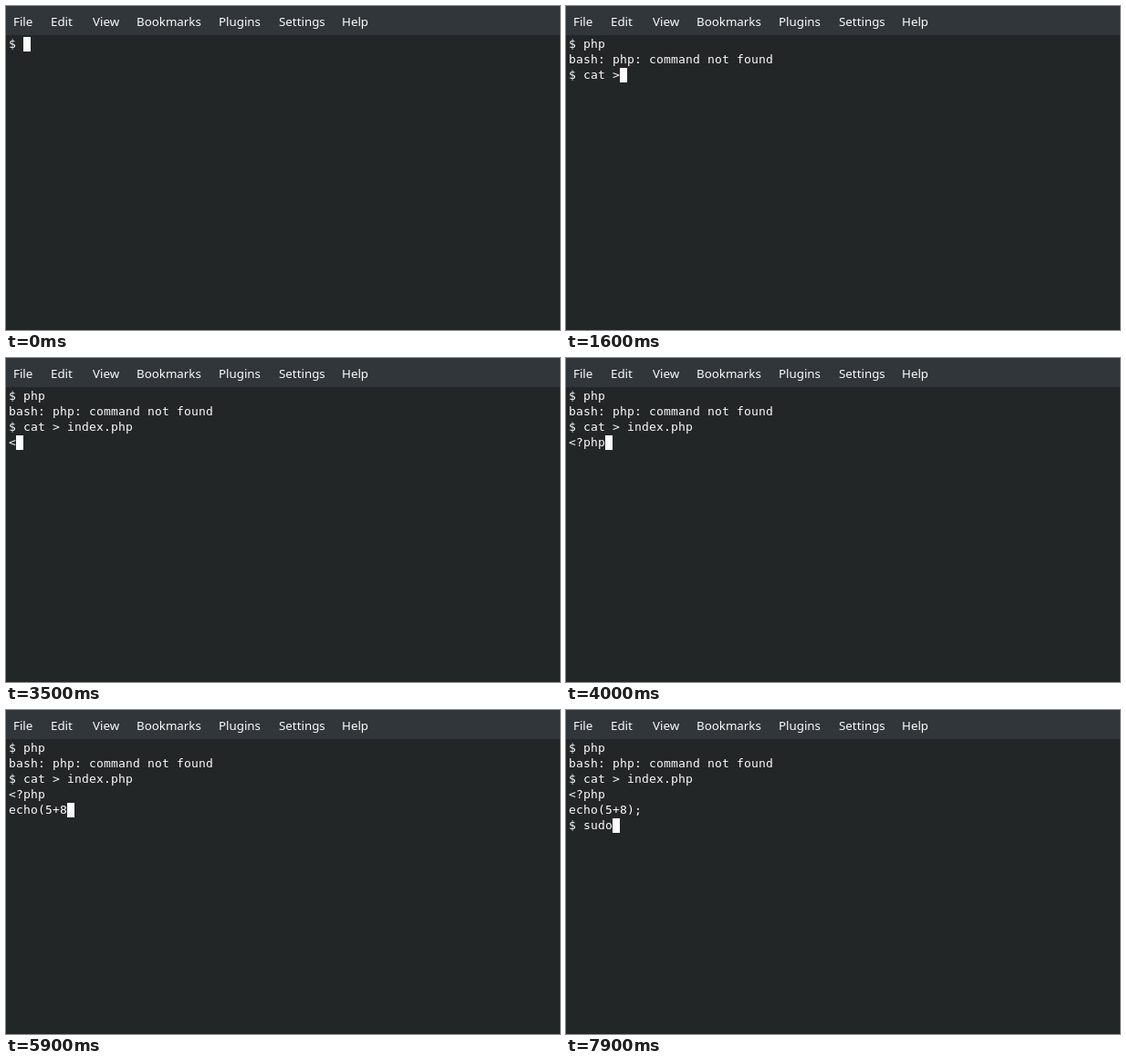
Recreate the animation shown at these times as an HTML page with a canvas. Size 607 by 356 pixels, loop 8 s.

```html
<!DOCTYPE html>
<html lang="en">
<head>
<meta charset="utf-8">
<title>Terminal session</title>
<style>
  html, body { margin: 0; width: 100%; height: 100%; overflow: hidden; background: #232627; }
  canvas { display: block; }
</style>
</head>
<body>
<canvas id="stage" width="607" height="356"></canvas>
<script>
const ctx = document.getElementById("stage").getContext("2d");
const LOOP = 8000;
const BACK = "#232627", BAR = "#31363b", INK = "#fcfcfc";
const LEFT = 3, TOP = 34, CELL = 8, LINE = 17, CARET = 16, BASE = 12;

const menu = [
  ["File", 8], ["Edit", 49], ["View", 95], ["Bookmarks", 143],
  ["Plugins", 233], ["Settings", 299], ["Help", 368]
];

// Output events: [start in ms, chunks that follow every 100 ms]
const bursts = [
  [0, "$ "],
  [100, "p", "h", "p", "\nbash: php: command not found\n$ "],
  [1200, "c", "a", "t", " ", ">", " ", "in", "d"],
  [2100, "e", "x", "."],
  [2500, "ph", "p"],
  [2800, "\n"],
  [3500, "<", "?"],
  [3800, "p", "h", "p"],
  [4200, "\n"],
  [4400, "e"],
  [4700, "c", "h", "o"],
  [5100, "("],
  [5300, "5"],
  [5700, "+"],
  [5900, "8"],
  [6500, ")", ";"],
  [6900, "\n"],
  [7100, "$ "],
  [7600, "s"],
  [7800, "ud", "o"]
];

function screenAt(time) {
  let text = "";
  for (const [start, ...chunks] of bursts) {
    chunks.forEach((chunk, i) => {
      if (time >= start + i * 100) text += chunk;
    });
  }
  return text.split("\n");
}

function drawMenu() {
  ctx.fillStyle = BAR;
  ctx.fillRect(0, 0, 607, 32);
  ctx.fillStyle = INK;
  ctx.font = '13.33px "Noto Sans", sans-serif';
  for (const [label, x] of menu) ctx.fillText(label, x, 22);
}

function drawTerminal(lines) {
  ctx.fillStyle = INK;
  ctx.font = '13px "DejaVu Sans Mono", monospace';
  lines.forEach((line, row) => {
    [...line].forEach((char, col) => {
      ctx.fillText(char, LEFT + col * CELL, TOP + row * LINE + BASE);
    });
  });
  const row = lines.length - 1;
  ctx.fillRect(LEFT + lines[row].length * CELL, TOP + row * LINE, CELL, CARET);
}

function render(time) {
  ctx.fillStyle = BACK;
  ctx.fillRect(0, 0, 607, 356);
  drawMenu();
  drawTerminal(screenAt(time));
}

let origin = null;
function tick(now) {
  if (origin === null) origin = now;
  render((now - origin) % LOOP);
  requestAnimationFrame(tick);
}
render(0);
requestAnimationFrame(tick);
</script>
</body>
</html>
```
